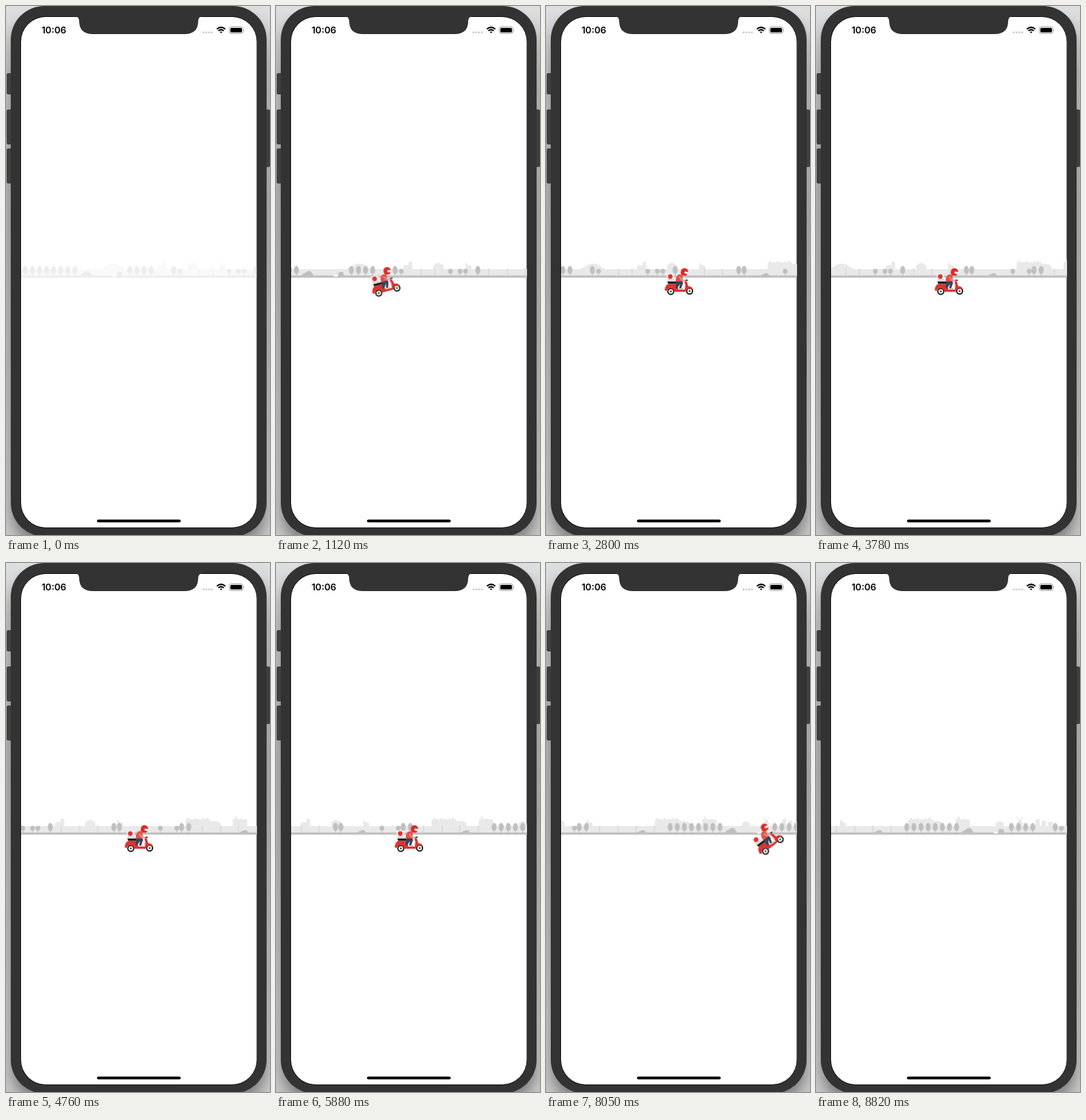
Write an HTML page that moves like this. It is 386 by 772 pixels and loops after 8.89 s.

```html
<!DOCTYPE html>
<html lang="en">
<head>
<meta charset="utf-8">
<title>Delivery scooter</title>
<style>
  html, body { margin: 0; width: 100%; height: 100%; overflow: hidden; }
  svg { display: block; width: 386px; height: 772px; }
  #scene, #back, #front, #ride, #tilt { animation: 8890ms linear infinite; }
  #scene { animation-name: fade; }
  #back { animation-name: back; }
  #front { animation-name: front; }
  #ride { animation-name: ride; }
  #tilt { animation-name: tilt; transform-origin: 194px 402px; }
  @keyframes fade { 0% { opacity: .28; } 4%, 100% { opacity: 1; } }
  @keyframes back { to { transform: translateX(-279.2px); } }
  @keyframes front { to { transform: translateX(-562.7px); } }
  @keyframes ride {
    0%, 6.52% { transform: translateX(-200px); animation-timing-function: cubic-bezier(.333, .667, .667, 1); }
    17.1% { transform: none; }
    82.11% { transform: none; animation-timing-function: cubic-bezier(.333, 0, .667, .333); }
    92.69%, 100% { transform: translateX(200px); }
  }
  @keyframes tilt {
    0%, 6.52% { transform: rotate(-34deg); }
    17.1%, 82.11% { transform: rotate(0deg); }
    92.69%, 100% { transform: rotate(-47deg); }
  }
</style>
</head>
<body>
<svg viewBox="0 0 386 772">
  <defs>
    <linearGradient id="wall" x2="0" y2="1">
      <stop offset="0" stop-color="#dedfe1"/>
      <stop offset=".12" stop-color="#c2c2c2"/>
      <stop offset=".4" stop-color="#b4b4b4"/>
      <stop offset="1" stop-color="#c6c6c6"/>
    </linearGradient>
    <filter id="blur" x="-20%" y="-10%" width="140%" height="120%"><feGaussianBlur stdDeviation="9"/></filter>
    <clipPath id="screen"><rect x="22" y="16" width="344.5" height="745" rx="36"/></clipPath>
  </defs>

  <rect width="386" height="772" fill="url(#wall)"/>
  <rect x="9" y="14" width="370" height="775" rx="48" opacity=".35" filter="url(#blur)"/>
  <g fill="#3f3f40">
    <rect x="1" y="98" width="9" height="31" rx="2"/>
    <rect x="1" y="151" width="9" height="51" rx="2"/>
    <rect x="1" y="208" width="9" height="51" rx="2"/>
    <rect x="376" y="151" width="10" height="84" rx="2"/>
  </g>
  <rect x="7" y="0" width="374" height="774" rx="49" fill="#333"/>
  <rect x="21" y="15" width="346" height="747" rx="37" fill="#111"/>
  <rect x="22" y="16" width="344.5" height="745" rx="36" fill="#fff"/>
  <path d="M101 15Q107 16 107 22Q107 41 127 41H261Q281 41 281 22Q281 16 287 15Z" fill="#333"/>

  <text x="70" y="40" text-anchor="middle" font-family="Inter, Roboto, sans-serif" font-weight="600" font-size="13.4">10:06</text>
  <g fill="#c6c6c6">
    <circle cx="288.8" cy="38.6" r="1.4"/><circle cx="292.9" cy="38.6" r="1.4"/>
    <circle cx="297" cy="38.6" r="1.4"/><circle cx="301.1" cy="38.6" r="1.4"/>
  </g>
  <g fill="none" stroke="#000" stroke-width="2">
    <path d="M308.3 33.8Q314.5 28.4 320.7 33.8M310.6 36.3Q314.5 33 318.4 36.3"/>
    <path d="M312.7 37.9Q314.5 36.6 316.3 37.9L314.5 39.8Z" fill="#000" stroke="none"/>
  </g>
  <rect x="326.5" y="30.5" width="20" height="9.6" rx="2.8" fill="none" stroke="#999"/>
  <rect x="328" y="32" width="17" height="6.6" rx="1.5"/>
  <path d="M347.6 33.7q1.3 1.6 0 3.2z" fill="#999"/>
  <rect x="133" y="749.5" width="122.5" height="4" rx="2"/>

  <g clip-path="url(#screen)">
    <g id="scene">
      <rect x="22" y="384" width="345" height="10" fill="#e9e9e9"/>
      <g id="back" fill="#e9e9e9">
        <path d="M136 385Q146 380 150 377Q157 375 163 377Q168 381 177 385Z"/>
        <path d="M221 385V380L224 378H229V375L231.500 372L234.500 375V385Z"/>
        <path d="M265 385V379L268 376.500L272 374.500L277 376.500L280 379V385Z"/>
        <path d="M312 385V377L313.200 372.500L314.400 377L317 378L321 380V385Z"/>
        <path d="M412 385V375H414V373L416 371L418 375L421 373L423 375L427 371.500L429 375L432 373L435 375L438 371.500L440 375L443 370.500L445 374H448V376.500H456Q461 377 463 380V385Z"/>
        <path d="M481 385V374H484V369H485V374L486 368L487.500 374H490L493 373L495 374H502V385Z"/>
        <path d="M539.500 385V381Q541 377 545.500 377Q550 377 551.500 381V385Z"/>
        <path d="M571 385L573.500 376H576.500L579 385Z"/>
        <path d="M570 371L580 381M580 371L570 381" stroke="#dedede" stroke-width="1"/>
        <path d="M598 385V373.500H604V385ZM607 385V376H613V385ZM616 385V378H623V385Z"/>
      </g>
      <rect x="22" y="393.300" width="345" height="3.200" fill="#bfbfbf"/>
      <g id="front">
        <path id="poles" stroke="#cecece"/>
        <path id="plants" fill="#bfbfbf"/>
        <path id="gaps" fill="#fff"/>
      </g>
    </g>

    <g id="ride"><g id="tilt">
      <g fill="#fff" stroke="#171717" stroke-width="1.900">
        <circle cx="182.500" cy="416.500" r="4.300"/>
        <circle cx="210" cy="416" r="4.300"/>
      </g>
      <circle cx="182.500" cy="416.500" r="1.500" fill="#555"/>
      <circle cx="210" cy="416" r="1.500" fill="#555"/>
      <path d="M173.500 415Q174 407 179 405.500H191L193 412H201L203 401L206 402L208 409Q214 409 215 414Q211 411.500 207 413L204 417H188Q186 411.500 181 412Q177 413 176.500 416Z" fill="#dc3430"/>
      <path d="M201.500 402Q205 405 203 414H199Q202 409 201.500 402Z" fill="#f5eeee"/>
      <rect x="176.500" y="390.500" width="11" height="11.500" rx="1" fill="#f1eded"/>
      <circle cx="181.700" cy="394.800" r="3.400" fill="#dc3430"/>
      <path d="M178 400H187" stroke="#aaa" stroke-width=".8"/>
      <path d="M177.500 402H190L192 405.500H178.500Z" fill="#241b21"/>
      <path d="M190.500 401.500L199 401.500L200.500 404L197.500 412.500H194.500L196 405.500L192 412H189.500Z" fill="#35445d"/>
      <path d="M193 413H199" stroke="#eee" stroke-width="1.500"/>
      <path d="M189.500 402Q189 394 195 391.500L199.500 393L200 402Z" fill="#e3504b"/>
      <path d="M195 395L198.500 400L205 401" fill="none" stroke="#ef908a" stroke-width="2"/>
      <path d="M204 400L207.500 400.500" stroke="#222" stroke-width="1.400"/>
      <path d="M197 389Q197 382.500 202.500 382.500Q207.500 383 208 388L203 387.500L202.500 390L207 391.500L205 393.500H200Q197 392.500 197 389Z" fill="#d82e2b"/>
      <path d="M203 387.700L208 388.200L207 391.500L202.500 390Z" fill="#f7e6df"/>
    </g></g>
  </g>
</svg>
<script>
  const LOOP = 8890, STEP = 70, PERIOD = 663;
  const row = (x, n) => Array.from({ length: n }, (_, i) => x + i * 10.4);
  const tall = [...row(28, 8), ...row(181, 4), 245, 366, 459, 467, 558, 568.5];
  const short = [254, 326, 340, 348, 527, 551];
  const poles = [283, 303, 382, 409, 435, 588, 615, 641, 668];

  const tree = (x, rx, ry, cy) =>
    `M${x - rx} ${cy}a${rx} ${ry} 0 1 1 ${2 * rx} 0a${rx} ${ry} 0 1 1 ${-2 * rx} 0Z` +
    `M${x - .6} ${cy}h1.2V394h-1.2Z`;
  const bush = x => `M${x - 6} 394q2-3 5-3q2-2 5-.8q2 .8 2.500 3.800Z`;
  const mound = x => `M${x - 9} 394q2-4 5-4q3-3.500 8-3.200l2 2.200l3 5Z`;
  const crate = x => `M${x - 4.5} 394l1.500-6h6l1.500 6Z`;

  let plants = "", gaps = "";
  for (const dx of [0, PERIOD]) {
    for (const x of tall) plants += tree(x + dx, 3.6, 6, 385.2);
    for (const x of short) plants += tree(x + dx, 3.4, 3.4, 387);
    plants += mound(117 + dx) + crate(166 + dx) + bush(497 + dx) + bush(649 + dx);
    gaps += `M${154 + dx} 392.500h8l-1.500 2.500h-4Z`;
  }
  const setPath = (id, d) => document.getElementById(id).setAttribute("d", d);
  setPath("plants", plants);
  setPath("gaps", gaps);
  setPath("poles", poles.map(x => `M${x} 383V394`).join(""));

  // Hold every pose for one step of the clock.
  const moves = document.getAnimations();
  moves.forEach(m => m.pause());
  const start = performance.now();
  function tick() {
    const t = Math.floor((performance.now() - start) % LOOP / STEP) * STEP;
    moves.forEach(m => { m.currentTime = t; });
    requestAnimationFrame(tick);
  }
  tick();
</script>
</body>
</html>
```
